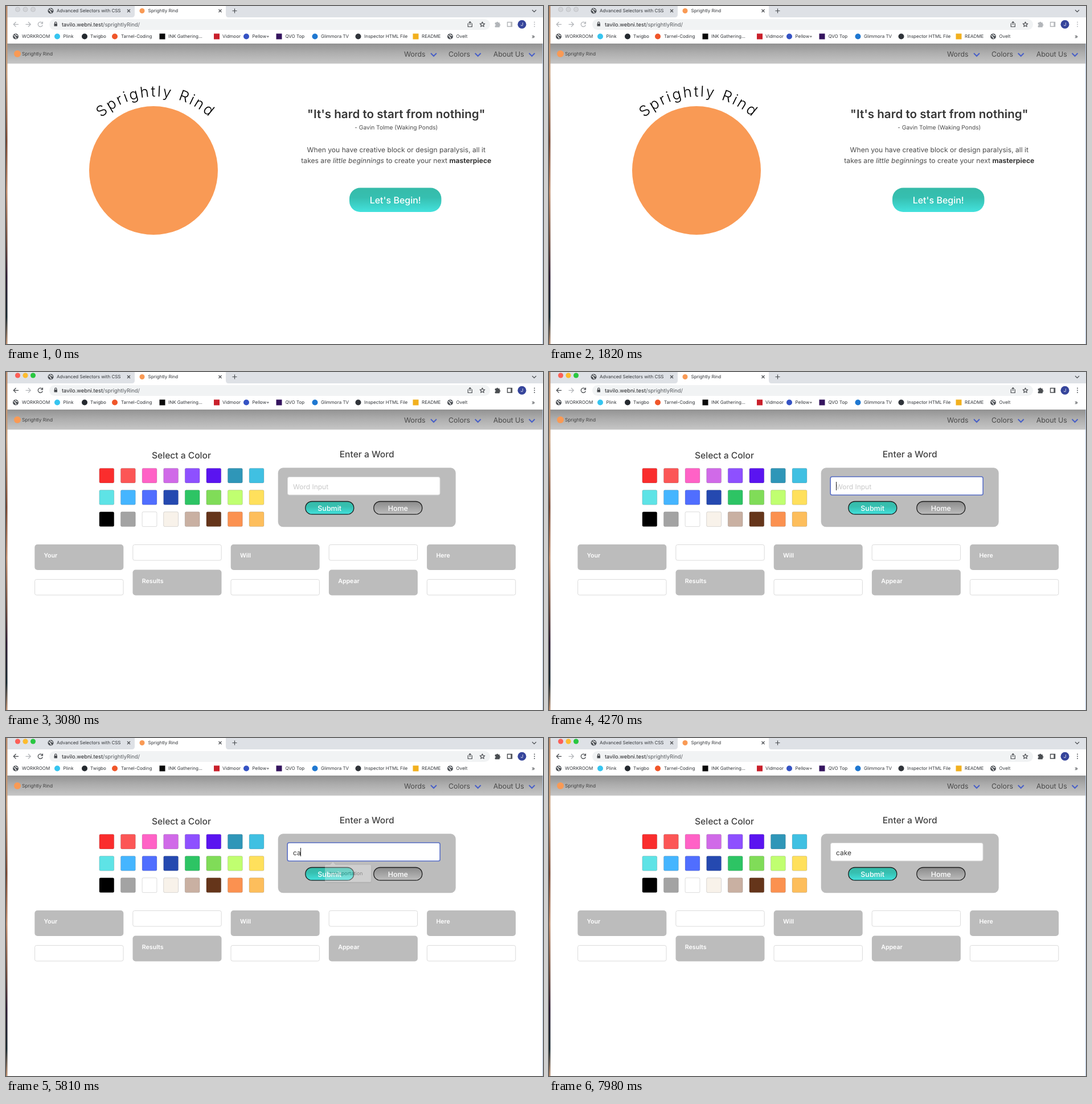
An HTML page that plays this animation: 943x594 px, repeating every 8 s.

```html
<!DOCTYPE html>
<html lang="en">
<head>
<meta charset="utf-8">
<title>Sprightly Rind</title>
<style>
  html, body { margin: 0; width: 100%; height: 100%; overflow: hidden; background: #fff; }
  svg { display: block; width: 943px; height: 594px; }
  text { font-family: Inter, "Open Sans", sans-serif; text-rendering: geometricPrecision; white-space: pre; }
  .mid { text-anchor: middle; }
  .small { font-size: 8px; fill: #33363a; }
  .nav { font-size: 12.4px; fill: #4a4a4a; }
  .body { font-size: 12.1px; fill: #4a4a4a; }
  .title { font-size: 15.6px; font-weight: 500; fill: #404040; }
  .label { font-size: 12.5px; font-weight: 500; fill: #fff; }
  .card { font-size: 10.6px; font-weight: 600; fill: #fff; }
  .line { fill: none; stroke-width: 1.2; stroke: #4a4d51; }
  .box { fill: #fff; stroke: #dbdbdb; }

  /* One 8 s loop; every part switches hard unless stated. */
  .anim { animation: 8s step-end infinite; }
  .lights { animation-name: lights; }
  .tools { animation-name: tools; color: #4a4d51; }
  .home { animation-name: home; }
  .app { animation-name: app; }
  .focus { animation-name: focus; }
  .hint { animation-name: hint; }
  .tip { animation-name: tip; animation-timing-function: linear; }
  .key1 { animation-name: key1; }
  .key2 { animation-name: key2; }
  .key3 { animation-name: key3; }
  .key4 { animation-name: key4; }
  .caret { animation-name: caret; }

  @keyframes lights { 0% { opacity: 0 } 35.83%, 100% { opacity: 1 } }
  @keyframes tools { 0% { color: #b2b5b9 } 37.58%, 100% { color: #4a4d51 } }
  @keyframes home { 0% { opacity: 1 } 38.45%, 100% { opacity: 0 } }
  @keyframes app { 0% { opacity: 0 } 38.45%, 100% { opacity: 1 } }
  @keyframes focus { 0% { opacity: 0 } 52.45% { opacity: 1 } 99.7%, 100% { opacity: 0 } }
  @keyframes hint { 0% { opacity: 1 } 70.83%, 100% { opacity: 0 } }
  @keyframes tip { 0%, 55.9% { opacity: 0 } 58.6%, 70.8% { opacity: 1 } 73.4%, 100% { opacity: 0 } }
  @keyframes key1 { 0% { fill-opacity: 0 } 70.83%, 100% { fill-opacity: 1 } }
  @keyframes key2 { 0% { fill-opacity: 0 } 72.58%, 100% { fill-opacity: 1 } }
  @keyframes key3 { 0% { fill-opacity: 0 } 83.08%, 100% { fill-opacity: 1 } }
  @keyframes key4 { 0% { fill-opacity: 0 } 84.83%, 100% { fill-opacity: 1 } }
  @keyframes caret {
    0% { opacity: 0; transform: translateX(504px) }
    52.45% { opacity: 1; transform: translateX(504px) }
    63.83% { opacity: 0; transform: translateX(504px) }
    70.83% { opacity: 1; transform: translateX(511px) }
    72.58% { opacity: 1; transform: translateX(517px) }
    80.45% { opacity: 0; transform: translateX(517px) }
    83.08% { opacity: 1; transform: translateX(524px) }
    84.83% { opacity: 1; transform: translateX(530px) }
    90.95% { opacity: 0; transform: translateX(530px) }
    97.95% { opacity: 1; transform: translateX(530px) }
    99.7%, 100% { opacity: 0; transform: translateX(530px) }
  }
</style>
</head>
<body>
<svg viewBox="0 0 943 594" xmlns="http://www.w3.org/2000/svg">
  <defs>
    <linearGradient id="bar" x2="0" y2="1">
      <stop stop-color="#929292"/><stop offset=".45" stop-color="#adadad"/><stop offset="1" stop-color="#c6c6c6"/>
    </linearGradient>
    <linearGradient id="teal" x2="0" y2="1">
      <stop stop-color="#36bba9"/><stop offset=".4" stop-color="#36bfb0"/><stop offset="1" stop-color="#43e2dd"/>
    </linearGradient>
    <linearGradient id="gray" x2="0" y2="1">
      <stop stop-color="#8b8b8b"/><stop offset="1" stop-color="#bdbdbd"/>
    </linearGradient>
    <linearGradient id="desk" x2="0" y2="1">
      <stop stop-color="#b98a6a"/><stop offset=".2" stop-color="#c9a07e"/><stop offset=".4" stop-color="#7a4630"/>
      <stop offset=".55" stop-color="#c08c6c"/><stop offset=".7" stop-color="#6e4a3c"/><stop offset=".8" stop-color="#2b1830"/>
      <stop offset=".92" stop-color="#14262e"/><stop offset="1" stop-color="#c09070"/>
    </linearGradient>
    <filter id="shade" x="-20%" y="-30%" width="140%" height="170%">
      <feDropShadow dx="0" dy="1" stdDeviation="1.5" flood-opacity=".3"/>
    </filter>
    <path id="arc" d="M123 299A140 140 0 0 1 403 299"/>
    <g id="globe">
      <circle r="5" fill="#4d5156"/>
      <path d="M-3.6-1.6Q-1-.8-.4 1T1.2 3.8M-1-3.8Q.6-1.6 3.7-1.2" fill="none" stroke="#fff" stroke-width="1.3"/>
    </g>
    <path id="close" class="line" d="M-2.5-2.5l5 5m0-5l-5 5"/>
    <path id="chevron" d="M-5-2.5L0 2.5 5-2.5" fill="none" stroke="#485fc7" stroke-width="2"/>
  </defs>

  <rect width="943" height="594" fill="#fff"/>

  <!-- browser tabs -->
  <rect width="943" height="20" fill="#dee1e6"/>
  <path d="M221 20Q226 20 226 15V0H386V15Q386 20 391 20Z" fill="#fff"/>
  <g fill="#d3d5d9" stroke="#b9bbbf" stroke-width=".7">
    <circle cx="20.5" cy="6" r="4"/><circle cx="34" cy="6" r="4"/><circle cx="47.5" cy="6" r="4"/>
  </g>
  <g class="anim lights">
    <circle cx="20.5" cy="6" r="4.5" fill="#fe5f57"/>
    <circle cx="34" cy="6" r="4.5" fill="#febc2e"/>
    <circle cx="47.5" cy="6" r="4.5" fill="#28c840"/>
  </g>
  <use href="#globe" x="78.5" y="8.5"/>
  <text class="small" x="89" y="11.4">Advanced Selectors with CSS</text>
  <use href="#close" x="215.5" y="8.5"/>
  <circle cx="239" cy="8.5" r="4.5" fill="#f99a55"/>
  <text class="small" x="249.5" y="11.4">Sprightly Rind</text>
  <use href="#close" x="376" y="8.5"/>
  <path class="line" d="M397.5 8.5h8m-4-4v8M924 7l3.5 3.5L931 7"/>

  <!-- toolbar -->
  <rect x="76" y="23" width="774" height="19" rx="9.5" fill="#f1f3f4"/>
  <g class="anim tools" fill="none" stroke="currentColor" stroke-width="1.3">
    <path d="M22 32.3H13.5M17.5 28l-4.2 4.3 4.2 4.3"/>
    <path d="M63.6 29.7A4.1 4.1 0 1 0 64.3 33.5M64.4 27.5V30.8H61"/>
    <path d="M859 29.5h2.3a1.4 1.4 0 0 1 2.8 0h2.4v2.4a1.4 1.4 0 0 1 0 2.8v2.3H859v-2.3a1.4 1.4 0 0 0 0-2.8Z" fill="currentColor" stroke-width=".8"/>
    <path d="M880.5 28.5h8v7.5h-8ZM887 28.5V36" stroke-width="1.4"/>
    <path d="M928 28.5v.1m0 3.6v.1m0 3.6v.1" stroke-width="1.8" stroke-linecap="round"/>
  </g>
  <path d="M34.5 32.3H43M39 28l4.2 4.3L39 36.6" fill="none" stroke="#b2b5b9" stroke-width="1.3"/>
  <rect x="84.5" y="31" width="5.5" height="4.5" rx=".6" fill="#4a4d51"/>
  <path class="line" d="M85.6 31.5V29.8a1.65 1.65 0 0 1 3.3 0V31.5"/>
  <text x="98" y="35.5" font-size="9.4" fill="#202124">tavilo.webni.test<tspan fill="#55595e">/sprightlyRind/</tspan></text>
  <path class="line" d="M812.5 31h-1.2v5.5h7V31h-1.2M814.8 33.5V27.5m-2.2 2.2l2.2-2.2 2.2 2.2"/>
  <path class="line" stroke-linejoin="round" d="M836.5 28l1.3 2.8 3 .3-2.3 2.1.7 3-2.7-1.6-2.7 1.6.7-3-2.3-2.1 3-.3Z"/>
  <circle cx="906" cy="32.3" r="7.5" fill="#36459b"/>
  <text class="mid" x="906" y="35.2" font-size="8" fill="#fff">J</text>

  <g id="bookmarks"></g>
  <text class="small" x="923" y="56.5" style="font-size:10px">»</text>

  <!-- site header -->
  <rect x="2" y="66" width="941" height="35.3" fill="url(#bar)"/>
  <circle cx="20" cy="84" r="6" fill="#f99a55"/>
  <text x="28" y="86.5" font-size="8.4" font-weight="300" fill="#222">Sprightly Rind</text>
  <text class="nav" x="699" y="89">Words</text>
  <text class="nav" x="777" y="89">Colors</text>
  <text class="nav" x="855.7" y="89">About Us</text>
  <use href="#chevron" x="751" y="85.5"/>
  <use href="#chevron" x="828.7" y="85.5"/>
  <use href="#chevron" x="923.5" y="85.5"/>

  <!-- landing page -->
  <g class="anim home">
    <circle cx="259" cy="289" r="113" fill="#f99a55"/>
    <text class="mid" font-size="26" font-weight="300" letter-spacing="3"><textPath href="#arc" startOffset="50%">Sprightly Rind</textPath></text>
    <text class="mid" x="685.3" y="196.5" font-size="20.6" font-weight="600" fill="#363636">"It's hard to start from nothing"</text>
    <text class="mid" x="685.3" y="216.8" font-size="10.2" fill="#4a4a4a">- Gavin Tolme (Waking Ponds)</text>
    <text class="body mid" x="685.3" y="256.6">When you have creative block or design paralysis, all it</text>
    <text class="body mid" x="685.3" y="276">takes are <tspan font-style="italic">little beginnings</tspan> to create your next <tspan font-weight="700" fill="#363636">masterpiece</tspan></text>
    <rect x="603" y="319.5" width="161.5" height="42.5" rx="19" fill="url(#teal)"/>
    <text class="label mid" x="683.7" y="347" style="font-size:16px">Let's Begin!</text>
  </g>

  <!-- picker page -->
  <g class="anim app">
    <text class="title mid" x="308" y="151.6">Select a Color</text>
    <text class="title mid" x="633.7" y="150.3">Enter a Word</text>
    <g id="swatches"></g>
    <rect x="477.7" y="168.3" width="312" height="104" rx="9" fill="#bcbcbc"/>
    <rect class="box" x="494.5" y="184.5" width="267.5" height="31.5" rx="3"/>
    <rect class="anim focus" x="494.2" y="184" width="268" height="32.3" rx="3" fill="none" stroke="#5a70c8" stroke-width="1.6"/>
    <text class="anim hint" x="504" y="205.6" font-size="12" fill="#c8c8c8">Word Input</text>
    <text x="504" y="205.6" font-size="12" fill="#363636"><tspan class="anim key1">c</tspan><tspan class="anim key2">a</tspan><tspan class="anim key3">k</tspan><tspan class="anim key4">e</tspan></text>
    <rect class="anim caret" y="193" width="1" height="15" fill="#222"/>
    <g stroke="#1c1c1c" stroke-width="1.3">
      <rect x="525.8" y="227.5" width="85" height="22.7" rx="11.3" fill="url(#teal)"/>
      <rect x="645.8" y="227.5" width="85" height="22.7" rx="11.3" fill="url(#gray)"/>
    </g>
    <text class="label mid" x="568.2" y="243.8">Submit</text>
    <text class="label mid" x="688.3" y="243.8">Home</text>
    <g id="cards"></g>
    <g class="anim tip">
      <path d="M562 223H569L574 218 579 223H639Q641 223 641 225V251Q641 253 639 253H562Q560 253 560 251V225Q560 223 562 223Z" fill="#fff" filter="url(#shade)"/>
      <text x="568" y="241.3" font-size="8.8" fill="#111">transportation</text>
    </g>
  </g>

  <!-- desktop showing past the window edges -->
  <rect width="2.5" height="594" fill="url(#desk)"/>
  <rect x="942" y="66" width="1" height="528" fill="#b4c6e0"/>
</svg>
<script>
  const fill = (id, items, draw) => {
    document.getElementById(id).innerHTML = items.map(draw).join('');
  };

  // icon centre, label start, label, icon colour, icon shape
  const bookmarks = [
    [17, 28, 'WORKROOM'],
    [90, 100.5, 'Plink', '#36c5f0', 'dot'],
    [138, 148, 'Twigbo', '#24292f', 'dot'],
    [191, 202, 'Tarnel-Coding', '#f0562a', 'dot'],
    [274.5, 285, 'INK Gathering...', '#0a0a0a', 'square'],
    [370, 380, 'Vidmoor', '#c9202b', 'square'],
    [422, 432.5, 'Pellow+', '#3553c4', 'dot'],
    [479.5, 490.5, 'QVO Top', '#35155f', 'square'],
    [542.5, 553, 'Glimmora TV', '#1f78d1', 'dot'],
    [618.5, 629, 'Inspector HTML File', '#30343a', 'dot'],
    [719.5, 730, 'README', '#f2b01e', 'square'],
    [780, 790.5, 'Ovelt']
  ];
  const icon = (x, color, shape) =>
    shape === 'dot' ? `<circle cx="${x}" cy="53.5" r="5" fill="${color}"/>`
    : shape ? `<rect x="${x - 5}" y="48.5" width="10" height="10" fill="${color}"/>`
    : `<use href="#globe" x="${x}" y="53.5"/>`;
  fill('bookmarks', bookmarks, ([x, textX, label, color, shape]) =>
    icon(x, color, shape) + `<text class="small" x="${textX}" y="56.4">${label}</text>`);

  const colors = [
    'fa2d2d fc5656 ff62c6 d06ae8 8e50ff 5a14f0 2f96b8 40c0e2',
    '5ee3e6 45b5ff 506eff 2549b0 2dc464 80dc58 c0ff70 ffe05c',
    '000000 a3a3a3 ffffff f8f2ea c9b0a2 65351a fb9150 fdbe5c'
  ].join(' ').split(' ');
  fill('swatches', colors, (color, i) => {
    const x = 163.9 + i % 8 * 37.6, y = 169.2 + Math.floor(i / 8) * 38.3;
    return `<rect x="${x}" y="${y}" width="25.8" height="25.8" rx="2" fill="#${color}" stroke="#000" stroke-opacity=".14"/>`;
  });

  fill('cards', ['Your', 'Results', 'Will', 'Appear', 'Here'], (word, i) => {
    const x = 50.3 + i * 172.2, low = i % 2;
    const cardY = low ? 347.5 : 303, boxY = low ? 303.5 : 364.5;
    return `<rect x="${x}" y="${cardY}" width="156" height="45" rx="5" fill="#bcbcbc"/>
      <rect class="box" x="${x + .3}" y="${boxY}" width="155.4" height="27.5" rx="3"/>
      <text class="card" x="${x + 16.3}" y="${cardY + 23.4}">${word}</text>`;
  });
</script>
</body>
</html>
```
